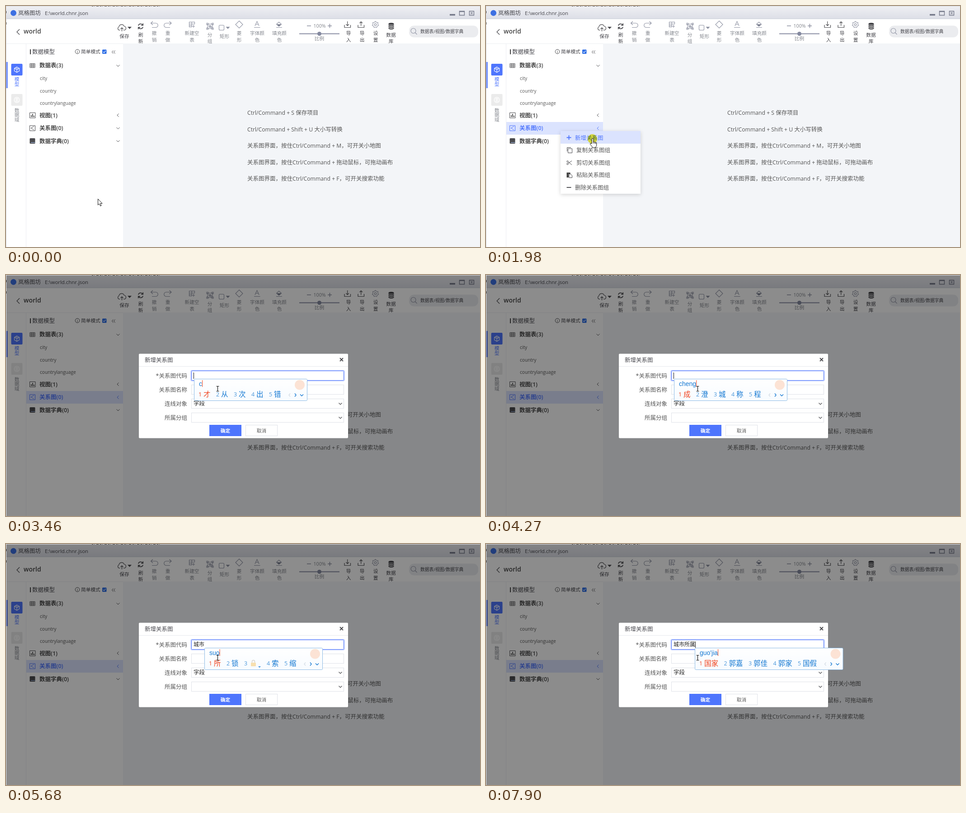
Animation of 1049 by 534 pixels, one loop 8 s. Source, as an HTML page:

```html
<!DOCTYPE html>
<html lang="zh-CN">
<head>
<meta charset="utf-8">
<title>新增关系图</title>
<style>
html, body { margin: 0; width: 100%; height: 100%; overflow: hidden; background: #fff; }
svg { display: block; }
text { font: 12.5px "Open Sans", "Noto Sans CJK SC", "Noto Sans CJK", sans-serif; fill: #555; white-space: pre; }
.s { font-size: 10.7px; }
.en { font-size: 10.2px; }
.lat { font-size: 12.2px; }
.b { font-weight: 600; fill: #444; }
.mid { text-anchor: middle; }
.end { text-anchor: end; }
.dark { fill: #44444a; }
.soft { fill: #85888f; }
.blue { fill: #4e75fd; }
.line, .thin, .bold { fill: none; stroke: #4a4a4e; stroke-width: 1.2; }
.thin { stroke-width: 1; }
.bold { stroke-width: 1.9; }
.grey { fill: none; stroke: #8f93a3; stroke-width: 1.1; }
.white { fill: none; stroke: #fff; stroke-width: 1.1; }
.box { fill: #fff; stroke: #dfe2e8; }
.hot { fill: #dbe3fe; }
.on text { fill: #4e75fd; }
.on path { stroke: #4e75fd; }
#ime text { font: 15.5px "Noto Sans CJK SC", "Noto Sans CJK", sans-serif; fill: #1478d2; }
#ime .py { font: 14px "Liberation Sans", sans-serif; }
#ime .num { font: 12.5px "Open Sans", sans-serif; fill: #4b97da; }
#ime .first { fill: #f0421c; }
#click { fill: #f4ee3c; mix-blend-mode: multiply; }
.ptr { fill: #fff; stroke: #111; stroke-linejoin: round; }
</style>
</head>
<body>
<svg width="1049" height="534" viewBox="0 0 1049 534">
<defs>
  <linearGradient id="bar" x2="0" y2="1"><stop stop-color="#eff0f4"/><stop offset="1" stop-color="#dcdee6"/></linearGradient>
  <linearGradient id="glass" x2="0" y2="1"><stop stop-color="#fff"/><stop offset="1" stop-color="#f7fbff"/></linearGradient>
  <filter id="shade" x="-20%" y="-20%" width="140%" height="140%"><feDropShadow dx="0" dy="2" stdDeviation="4" flood-opacity=".16"/></filter>
</defs>
<rect width="1049" height="534" fill="#fff"/>

<!-- title bar -->
<rect width="1049" height="29" fill="url(#bar)"/>
<path d="M0 28.5H1049" stroke="#cfd2da"/>
<path d="M.5 0V534M0 .5H1049" stroke="#d9dbe0"/>
<path d="M190 .5H340" stroke="#555" stroke-dasharray="3 2 1 4 5 3"/>
<path d="M.5 11V16M.5 36V41" stroke="#444"/>
<circle cx="16.5" cy="15.5" r="6.5" fill="#3c6fe2"/>
<text x="27" y="20" class="dark">岚格图坊</text>
<text x="86" y="20" class="dark" style="font-size:11.4px">E:\world.chnr.json</text>
<g fill="none" stroke="#747889" stroke-width="1.4">
  <path d="M982 19.5H994" stroke-width="3.4"/>
  <path d="M1003.5 11.5H1014.5V20.5H1003.5ZM1003 12.5H1015"/>
  <path d="M1025.5 11.5H1035.5V20.5H1025.5ZM1028.500 14L1032.500 18M1032.500 14L1028.500 18"/>
</g>

<!-- toolbar -->
<path class="line" d="M30 51.5L24 57.5 30 63.5"/>
<text x="39" y="61" class="b" style="font-size:14px">world</text>
<path class="line" d="M252.5 53.5H250.500A4 4 0 0 1 250 46 6 6 0 0 1 261.500 45 4.300 4.300 0 0 1 262 53.500H260M256.500 56V48M253.500 51L256.500 48 259.500 51"/>
<path d="M269 46H278L273.500 51Z" fill="#4a4a4e"/>
<path class="line" style="stroke-width:1.6" d="M292.800 43.500A5.400 5.400 0 0 1 302.500 42M303.200 46.500A5.400 5.400 0 0 1 293.500 48M303.300 38.500V42.600H299M292.700 51.500V47.400H297"/>
<path class="grey" d="M325 34L320.500 38 325 42M320.500 38H331.500A4.700 4.700 0 0 1 331.500 47.500H323"/>
<path class="grey" d="M361.500 34L366 38 361.500 42M366 38H354.500A4.700 4.700 0 0 0 354.500 47.500H363"/>
<path class="grey" d="M405.500 35.500H417.500V40H405.500ZM405.500 40V46.500H411V35.500M411 43.500H405.500M415 42V48M412 45H418"/>
<path class="grey" d="M446 40H457V50H446ZM444 38H447.500V41.500H444ZM455.500 38H459V41.500H455.500ZM444 48.500H447.500V52H444ZM455.500 48.500H459V52H455.500ZM449 43H453V46H449ZM451 45H455V48H451Z"/>
<rect class="grey" x="471.500" y="42.500" width="11" height="11" rx="2"/>
<path d="M486.500 46H495.500L491 51Z" fill="#8f93a3"/>
<path class="grey" d="M516 33L524 41 516 49 508 41Z"/>
<path class="grey" d="M551 44L555.500 34 560 44M552.700 40.500H558.300M549 47.500H562.500"/>
<path class="grey" d="M604 35.500L609.500 40.500 604 45 598.500 40.500ZM598 47.500H611"/>
<path d="M599 40.500H609.500L604 45Z" fill="#777b8c"/>
<path class="grey" d="M666 44H675M712 44H721M716.500 39.500V48.500" style="stroke-width:1.6"/>
<text x="694" y="48" class="s mid soft">100%</text>
<path d="M649 61.500H738" stroke="#8a8ea3" stroke-width="2"/>
<circle cx="693.500" cy="61.500" r="4.500" fill="#858aa0"/>
<path class="line" d="M749 42V47.500H762.500V42M755.700 34V43.500M752.500 40.500L755.700 43.700 759 40.500"/>
<path class="line" d="M779 42V47.500H792.500V42M785.700 44V35M782.500 38L785.700 34.800 789 38"/>
<path class="grey" d="M817.500 34L820 36.200 823.300 36.700 822.800 40 824.500 43 821.600 44.600 820.500 47.600 817.500 46.800 814.500 47.600 813.400 44.600 810.500 43 812.200 40 811.700 36.700 815 36.200Z"/>
<circle class="grey" cx="817.500" cy="41" r="2.300"/>
<g fill="#3c3c40"><ellipse cx="852.500" cy="39.500" rx="6" ry="2.300"/><path id="disk" d="M846.500 41Q852.500 44.800 858.500 41V43.200Q852.500 47 846.500 43.200Z"/><use href="#disk" y="3.500"/><use href="#disk" y="7"/></g>
<g id="labels"></g>
<rect x="892" y="43.500" width="153" height="26" rx="11" fill="#ebecef"/>
<circle class="grey" cx="901.500" cy="55" r="5.500"/><path class="grey" d="M905.500 59L909.500 63"/>
<text x="917" y="60" style="font-size:9.8px" class="dark">数据表/视图/数据字典</text>

<!-- work area -->
<rect x="259" y="83" width="790" height="451" fill="#f3f5f8"/>
<path d="M1 83.500H259M44.500 83V534" stroke="#eceef2"/>
<g>
  <text x="534" y="241"><tspan class="lat">Ctrl/Command + S </tspan>保存项目</text>
  <text x="534" y="278"><tspan class="lat">Ctrl/Command + Shift + U </tspan>大小写转换</text>
  <text x="534" y="314">关系图界面，按住<tspan class="lat">Ctrl/Command + M</tspan>，可开关小地图</text>
  <text x="534" y="350.500">关系图界面，按住<tspan class="lat">Ctrl/Command + </tspan>拖动鼠标，可拖动画布</text>
  <text x="534" y="387">关系图界面，按住<tspan class="lat">Ctrl/Command + F</tspan>，可开关搜索功能</text>
</g>

<!-- side tabs -->
<rect x="1" y="124" width="2.500" height="58" fill="#4e75fd"/>
<rect x="11.500" y="128" width="25" height="26" rx="2" fill="#4e75fd"/>
<path class="white" d="M24 135L29.500 138V144L24 147 18.500 144V138ZM18.500 138L24 141 29.500 138M24 141V147M21 136.500L27 139.500"/>
<rect x="11.500" y="195" width="25" height="26" rx="2" fill="#ebebeb"/>
<circle class="white" cx="24" cy="208" r="6"/><path class="white" d="M18 208H30M24 202V214M20 204Q24 207 28 204M20 212Q24 209 28 212"/>

<!-- tree -->
<rect x="53" y="96" width="2" height="11" fill="#444"/>
<text x="58" y="106" class="dark" style="font-weight:500">数据模型</text>
<circle class="thin" cx="158" cy="101" r="4.800"/><path d="M158 98.500V99.500M158 100.500V104" stroke="#555"/>
<text x="166" y="105" class="s dark">简单模式</text>
<rect x="213" y="96.500" width="9.500" height="9.500" rx="1.500" fill="#2f6fe6"/><path class="white" d="M215 101.500L217 103.500 220.800 99"/>
<path class="thin" d="M237.500 98.500L234.500 102 237.500 105.500M241.500 98.500L238.500 102 241.500 105.500"/>
<path class="thin" d="M53 127.500H64V136.500H53ZM53 130.500H64M53 133.500H64M56.700 127.500V136.500M60.300 127.500V136.500"/>
<text x="74" y="136" class="b">数据表(3)</text>
<text x="75" y="164" class="en">city</text><text x="75" y="191.500" class="en">country</text><text x="75" y="219" class="en">countrylanguage</text>
<path class="thin" d="M52.500 236.500H65V248H52.500Z"/><path d="M56 246V242M59 246V239M62 246V243" stroke="#444" stroke-width="1.700"/>
<text x="74" y="246.500" class="b">视图(1)</text>
<g id="row">
  <rect id="rowBg" class="hot" x="45" y="257" width="214" height="28"/>
  <path class="thin" d="M52.500 265H64.500V276.500H52.500ZM62 266.500L55 270.500 62 274.500"/>
  <text x="74" y="275" class="b">关系图(0)</text>
  <path id="rowArrow" class="thin"/>
</g>
<rect x="52.500" y="293" width="12" height="12" rx="1.500" fill="#4a4a4e"/><path d="M55 302.500H64.500" stroke="#a9c2ee"/>
<text x="74" y="303.500" class="b">数据字典(0)</text>
<path class="thin" d="M244.500 130.500L248 134 251.500 130.500M249.500 238.500L246 242 249.500 245.500M244.500 297.500L248 301 251.500 297.500"/>

<!-- context menu -->
<g id="menu">
  <rect x="165" y="277" width="177" height="139" fill="#fff" filter="url(#shade)"/>
  <g id="item">
    <rect id="itemBg" class="hot" x="165" y="277" width="177" height="28"/>
    <path class="bold" d="M178.500 291.500H188.500M183.500 286.500V296.500"/>
    <text x="197" y="296.500">新增关系图</text>
  </g>
  <path class="thin" d="M179.500 322V313.500H188M181.500 316H190.500V325.500H181.500Z"/>
  <text x="200" y="324">复制关系图组</text>
  <path class="thin" d="M190 343L182 348.500M190 352L182 345.500"/><circle class="thin" cx="180.500" cy="344.500" r="1.700"/><circle class="thin" cx="180.500" cy="350" r="1.700"/>
  <text x="200" y="351.500">剪切关系图组</text>
  <path d="M178.500 369H186.500V372H183V380H178.500Z" fill="#444"/><path class="thin" d="M184 372.500H187.500L190.500 375.500V380.500H184Z"/>
  <text x="200" y="379">粘贴关系图组</text>
  <path class="bold" d="M178.500 402H188.500"/>
  <text x="197" y="406.500">删除关系图组</text>
</g>

<!-- dialog -->
<g id="dialog">
  <rect x="1" y="1" width="1048" height="533" opacity=".45"/>
  <rect x="294" y="174.500" width="463" height="187" rx="2" fill="#fff"/>
  <path d="M294 202.500H757" stroke="#e6e8ec"/>
  <text x="307" y="193" class="dark">新增关系图</text>
  <path class="bold" d="M739 184L746 191M746 184L739 191"/>
  <text x="401" y="228" class="end">*关系图代码</text>
  <text x="401" y="259" class="end">关系图名称</text>
  <text x="401" y="290" class="end">连线对象</text>
  <text x="401" y="321" class="end">所属分组</text>
  <rect x="409.500" y="211.500" width="339" height="23" rx="2" fill="none" stroke="#4e75fd" stroke-opacity=".35" stroke-width="2"/>
  <rect x="410.500" y="212.500" width="337" height="21" rx="1" fill="#fff" stroke="#4e75fd"/>
  <rect class="box" x="410.500" y="243.500" width="337" height="21"/>
  <rect class="box" x="410.500" y="274.500" width="337" height="21"/>
  <rect class="box" x="410.500" y="305.500" width="337" height="21"/>
  <text x="415" y="289" style="fill:#222">字段</text>
  <path class="line" d="M736.500 283.500L740 287 743.500 283.500M736.500 314.500L740 318 743.500 314.500"/>
  <rect x="450" y="332" width="71" height="25" fill="#4e75fd"/>
  <text x="485.500" y="349" class="s mid" style="fill:#fff;font-weight:700">确定</text>
  <rect class="box" x="530.500" y="332.500" width="70" height="24"/>
  <text x="565.500" y="349" class="s mid">取消</text>
  <text id="value" x="415" y="227" style="font-size:12px;fill:#222"></text>
  <path id="caret" d="M0 216V230" stroke="#111"/>
  <g id="ime"></g>
</g>

<circle id="click" r="10.500"/>
<g id="cursor">
  <path id="arrow" class="ptr" d="M.5 .5V14L3.500 11.200 5.800 16.200 8 15.200 5.800 10.500H10Z"/>
  <path id="hand" class="ptr" d="M-.8 11V1A1.600 1.600 0 0 1 2.400 1V7Q4 5.800 5 7.600 6.700 6.600 7.500 8.400 9.700 7.800 9.700 10V14.500Q9.500 16.500 8 18V20H.5V18.500L-4.300 12.500Q-5.200 10.300-3 10.300ZM2.400 7V10.500M5 7.600V11M7.500 8.400V11.500"/>
  <path id="beam" d="M-2.500-5.500H3.500M.5-5.500V5.500M-2.500 5.500H3.500" fill="none" stroke="#111" stroke-width="1.200"/>
</g>
</svg>
<script>
const $ = id => document.getElementById(id);
const show = (id, on) => $(id).setAttribute("visibility", on ? "inherit" : "hidden");
const place = (id, x, y = 0) => $(id).setAttribute("transform", `translate(${x} ${y})`);
const last = (list, t) => list.filter(e => e[0] <= t).pop();

// centre x, class, then label and line centre pairs
const labels = [
  [262, "dark", "保存", 67], [298, "dark", "刷", 64, "新", 78],
  [328, "soft", "撤", 60, "销", 75], [358, "soft", "重", 60, "做", 75],
  [411.5, "soft", "新建空", 60, "表", 75], [451, "soft", "分", 64, "组", 78],
  [483.5, "soft", "矩形", 67], [516, "soft", "菱", 60, "形", 75],
  [556, "soft", "字体颜", 60, "色", 75], [605, "soft", "填充颜", 60, "色", 75],
  [693.5, "soft", "比例", 72], [758, "dark", "导", 60, "入", 75],
  [788, "dark", "导", 60, "出", 75], [818, "dark", "设", 60, "置", 75],
  [852, "dark", "数据", 64, "库", 78], [24, "blue", "模", 162, "型", 173],
  [24, "soft", "数", 231, "据", 241, "域", 252]
];
$("labels").innerHTML = labels.map(([x, cls, ...rows]) => rows.map((s, i) =>
  i % 2 ? "" : `<text x="${x}" y="${rows[i + 1] + 4}" class="s mid ${cls}">${s}</text>`).join("")).join("");

// start, end, steps, from, to
const moves = [
  [0, 700, 10, 203, 427, 164, 277],
  [1040, 1780, 11, 164, 277, 235, 294],
  [2310, 2730, 6, 235, 294, 468, 252]
];
const LOCK = "*";
const typing = [
  [0, ""], [3460, "c", "才 从 次 出 错"], [3600, "ch", "吃 出 车 长 穿"],
  [3800, "che", "车 扯 撤 彻 澈"], [3930, "chen", "陈 沉 晨 尘 辰"],
  [4070, "cheng", "成 澄 城 称 程"], [4410, "cheng's", "城市 程师 成熟 乘舒适 称是"],
  [4610, "cheng'shi", "城市 程式 成事 诚实 城事"], [4880, ""],
  [5340, "s", "是 时 说 三 所"], [5480, "su", "苏 速 素 宿 诉"],
  [5680, "suo", "所 锁 * 索 缩"], [5750, "suo's", "所属 所说的 所剩下 缩水了 所使用"],
  [6140, "suo'sh", "所示 所属 所说 缩水 所受"], [6280, "suo'shu", "所属 所述 所书 锁树 所数"],
  [6680, ""], [7210, "g", "个 过 给 更 该"], [7280, "gu", "古 顾 故 骨 股"],
  [7430, "guo", "国 过 果 锅 裹"], [7700, "guo'j", "国家 国际 过节 国军 过奖"],
  [7900, "guo'jia", "国家 郭嘉 郭佳 郭家 国假"]
];
const values = [[0, ""], [4880, "城市"], [6750, "城市所属"]];
const focusTimes = [[0], [2110], [4860], [6750]];

function drawIme(x, pinyin, words) {
  if (!pinyin) return "";
  let at = x + 10, items = "";
  words.split(" ").forEach((w, i) => {
    const first = i ? "" : "first";
    items += `<text x="${at - 1}" y="269" class="num ${first}">${i + 1}</text>`;
    if (w === LOCK) {
      items += `<path d="M${at + 16.5} 264V260.5a3 3 0 0 1 6 0V264" fill="none" stroke="#d8d4cc" stroke-width="1.5"/>
        <rect x="${at + 14}" y="263" width="11" height="8" rx="1" fill="#f7dfae"/>
        <path d="M${at + 30} 271h6l-3 3z" fill="#3b8fdc"/>`;
      at += 50;
    } else {
      items += `<text x="${at + 10}" y="270" class="${first}">${w}</text>`;
      at += 23.5 + 15.5 * w.length;
    }
  });
  const r = at + 45;
  return `<rect x="${x - .5}" y="230.5" width="${r - x}" height="48" rx="2" fill="url(#glass)" stroke="#8dbbe4"/>
    <circle cx="${r - 17}" cy="243.5" r="11" fill="#fce3d5"/>
    <text id="pinyin" x="${x + 10}" y="245.5" class="py">${pinyin}</text>
    <path id="mark" d="M0 233V248" stroke="#f0421c"/>${items}
    <g fill="none" stroke-width="1.4" stroke="#1478d2">
      <path d="M${r - 38} 262.5l-3 3.500 3 3.500" stroke="#d5dde6"/>
      <path d="M${r - 28} 262.5l3 3.500-3 3.500M${r - 16} 264.5l3.500 3.500 3.500-3.500"/></g>`;
}

let shown;
function render(t) {
  const [a, b, n, x0, y0, x1, y1] = last(moves, t);
  const p = Math.min(n, Math.floor((t - a) / (b - a) * n)) / n;
  const k = p * p * (3 - 2 * p), x = x0 + (x1 - x0) * k, y = y0 + (y1 - y0) * k;
  const picked = t >= 1040, dialog = t >= 2110, menu = picked && !dialog;
  const over = menu && p > 0, beam = dialog && x >= 410;

  place("cursor", Math.round(x), Math.round(y));
  show("arrow", !over && !beam);
  show("hand", over);
  show("beam", beam);

  show("click", t >= 900 && t < 1040 || t >= 1980 && t < 2110);
  place("click", x + .5, y + .5);

  $("row").setAttribute("class", picked ? "on" : "");
  show("rowBg", picked);
  $("rowArrow").setAttribute("d", picked ? "M249.5 267.5L246 271 249.5 274.5" : "M244.5 269L248 272.5 251.5 269");
  show("menu", menu);
  $("item").setAttribute("class", over ? "on" : "");
  show("itemBg", over);
  show("dialog", dialog);

  const value = last(values, t)[1];
  $("value").textContent = value;
  show("caret", dialog && (t - last(focusTimes, t)[0]) % 1080 < 540);
  place("caret", 415.5 + 12 * value.length);

  const key = last(typing, t);
  if (key === shown) return;
  shown = key;
  $("ime").innerHTML = drawIme(417 + 11.5 * value.length, key[1], key[2]);
  if (key[1]) place("mark", +$("pinyin").getAttribute("x") + $("pinyin").getComputedTextLength() + .5);
}

const start = performance.now();
(function tick() {
  render((performance.now() - start) % 8000);
  requestAnimationFrame(tick);
})();
</script>
</body>
</html>
```
